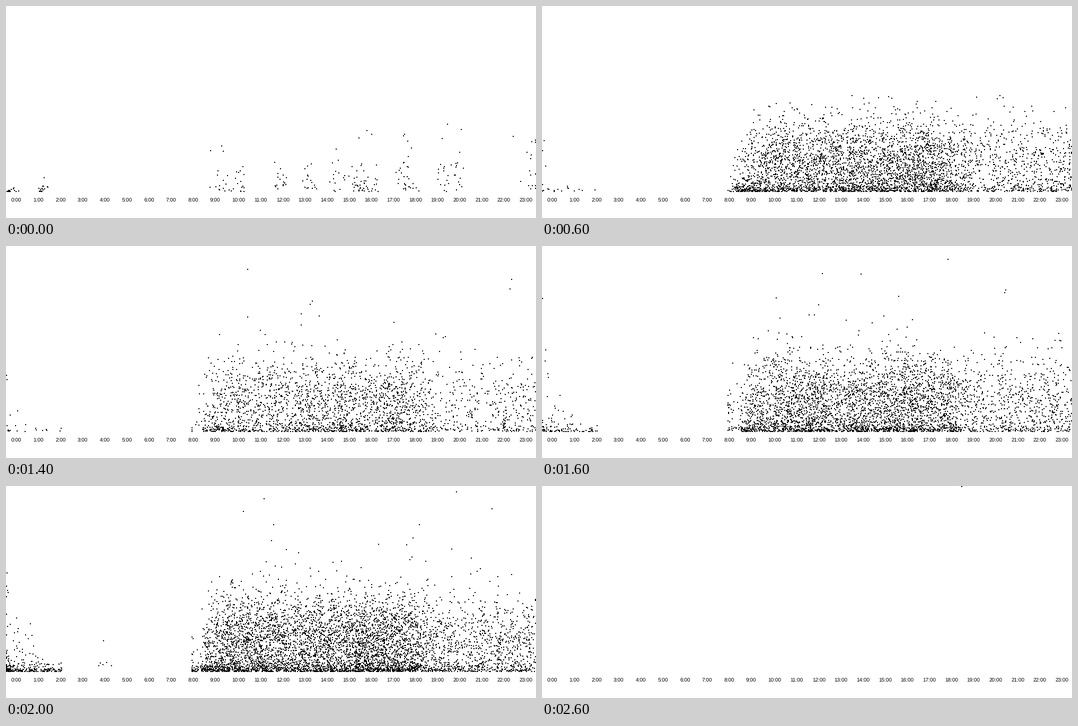
A matplotlib script that plays this animation: 1000 by 400 pixels, repeating every 2.8 s.

```python
import numpy as np
import matplotlib.pyplot as plt
from matplotlib.animation import FuncAnimation

W, H, DPI = 1000, 400, 100
BASE = 350          # top of a dot that rests on the time axis
HOUR = W / 24

# thousands of dots per picture, and the height its highest dot reaches
VOLUME = [.24, 1.3, 2.5, 4.2, 2.8, 1.2, 1.9, 2.5, 4.3, 6.4, 5.8, 5.1, 2.8]
TOP = [222, 117, 152, 168, 11, 140, 136, 43, 24, 22, 10, 23, 40]
FIRST_SESSIONS = [.3, 1.6, 9.7, 10.6, 12.5, 13.7, 14.9, 15.8, 16.1, 16.5,
                  18, 18.2, 19.7, 20.4, 23.7]


def workday_x(rng, n, start, full, evening, lull):
    """Positions over a busy day with lunch dip, dinner lull and quiet evening."""
    knots = [(start, .12), (full - 1, .25), (full, .62), (max(full + 5, 435), .95),
             (515, 1), (540, .82), (575, .95), (690, 1.06), (768, .95),
             (790, .55), (815, evening), (834, evening * lull),
             (852, evening), (W, evening)]
    kx, kw = np.transpose(knots)
    grid = np.arange(start, W)
    cdf = np.cumsum(np.interp(grid, kx, kw))

    def pick(k):
        return np.interp(rng.random(k), cdf / cdf[-1], grid)

    # half of the dots belong to short sessions, the rest are spread freely
    sessions = rng.choice(pick(n // 4), n) + rng.normal(0, 3, n)
    x = np.where(rng.random(n) < .5, sessions, pick(n))
    return np.clip(x, start, W - 2)


def workday(rng, i, volume):
    """The main cloud; quiet days open later and have calm evenings."""
    n = int(1000 * volume)
    pace = min(1, volume / 2.4)
    start = 450 - 100 * pace
    full = start + 25 * pace
    evening = min(.38, .1 + .12 * volume)
    x = workday_x(rng, n, start, full, evening, min(1, volume / 6))

    spread = 46 + .6 * i
    dusk = min(1, .2 + .3 * volume)
    scale = np.interp(x, [start, full, full + 45, 800, 840], [.6, .85, 1, 1, dusk])
    h = spread * scale * np.abs(rng.normal(1.12, .88, n))
    floor = np.interp(x, [start, full, full + 50], [.65, .55, .2])
    return x, np.where(rng.random(n) < floor, rng.exponential(7, n), h)


def night(rng, i):
    """Dots left over after midnight, thinning and sinking until 2:30."""
    n = 20 + 85 * max(i - 7, 0)
    x = 105 * rng.random(n) ** 1.7
    low = rng.random(n) < .6
    return x, rng.exponential(np.where(low, 5, 5 + .8 * np.maximum(70 - x, 0)))


def early(rng):
    return rng.normal(4.4 * HOUR, 5, 6), rng.exponential(18, 6)


def strays(rng, volume, top):
    """Thin outliers above the cloud, the highest one exactly at top."""
    n = 5 + int(4 * volume)
    rise = rng.random(n) ** .6
    rise[0] = 0
    return rng.uniform(420, 980, n), BASE - top - max(200 - top, 0) * rise


def scattered(rng):
    """A nearly empty day: separate sessions that grow taller towards night."""
    hours = np.repeat(FIRST_SESSIONS, 16)
    x = hours * HOUR + rng.normal(0, 8, hours.size)
    return x, rng.exponential(2 + 1.8 * hours)


def paint(parts, top):
    """White sheet with black 2 px dots from (x, height) groups."""
    x, h = np.concatenate(parts, axis=1)
    keep = h <= BASE - top
    xs = np.clip(x[keep], 0, W - 2).astype(int)
    ys = (BASE - h[keep]).astype(int)
    sheet = np.ones((H, W))
    for dx in (0, 1):
        for dy in (0, 1):
            sheet[ys + dy, xs + dx] = 0
    return sheet


def moment(i):
    rng = np.random.default_rng(40 + i)
    volume, top = VOLUME[i], TOP[i]
    if volume < 1:
        parts = [scattered(rng), ([832], [BASE - top])]
    else:
        parts = [workday(rng, i, volume), night(rng, i), strays(rng, volume, top)]
        if volume > 5:
            parts.append(early(rng))
    return paint(parts, top)


sheets = [moment(i) for i in range(len(VOLUME))]
sheets.append(paint([([791], [BASE])], 0))   # a single dot closes the loop

plt.rcParams["text.hinting"] = "none"
fig = plt.figure(figsize=(W / DPI, H / DPI), dpi=DPI, facecolor="white")
ax = fig.add_axes([0, 0, 1, 1])
ax.axis("off")
image = ax.imshow(sheets[0], cmap="gray", vmin=0, vmax=1, aspect="auto",
                  interpolation="nearest", extent=(0, W, H, 0))
ax.set(xlim=(0, W), ylim=(H, 0))

for hour in range(24):
    ax.text(10 + hour * HOUR, 370, f"{hour}:00", family="Liberation Sans",
            size=10 * 72 / DPI, color="black", ha="left", va="baseline")


def draw(i):
    image.set_data(sheets[i])
    return [image]


anim = FuncAnimation(fig, draw, frames=len(sheets), interval=200, repeat=True)
plt.show()
```
